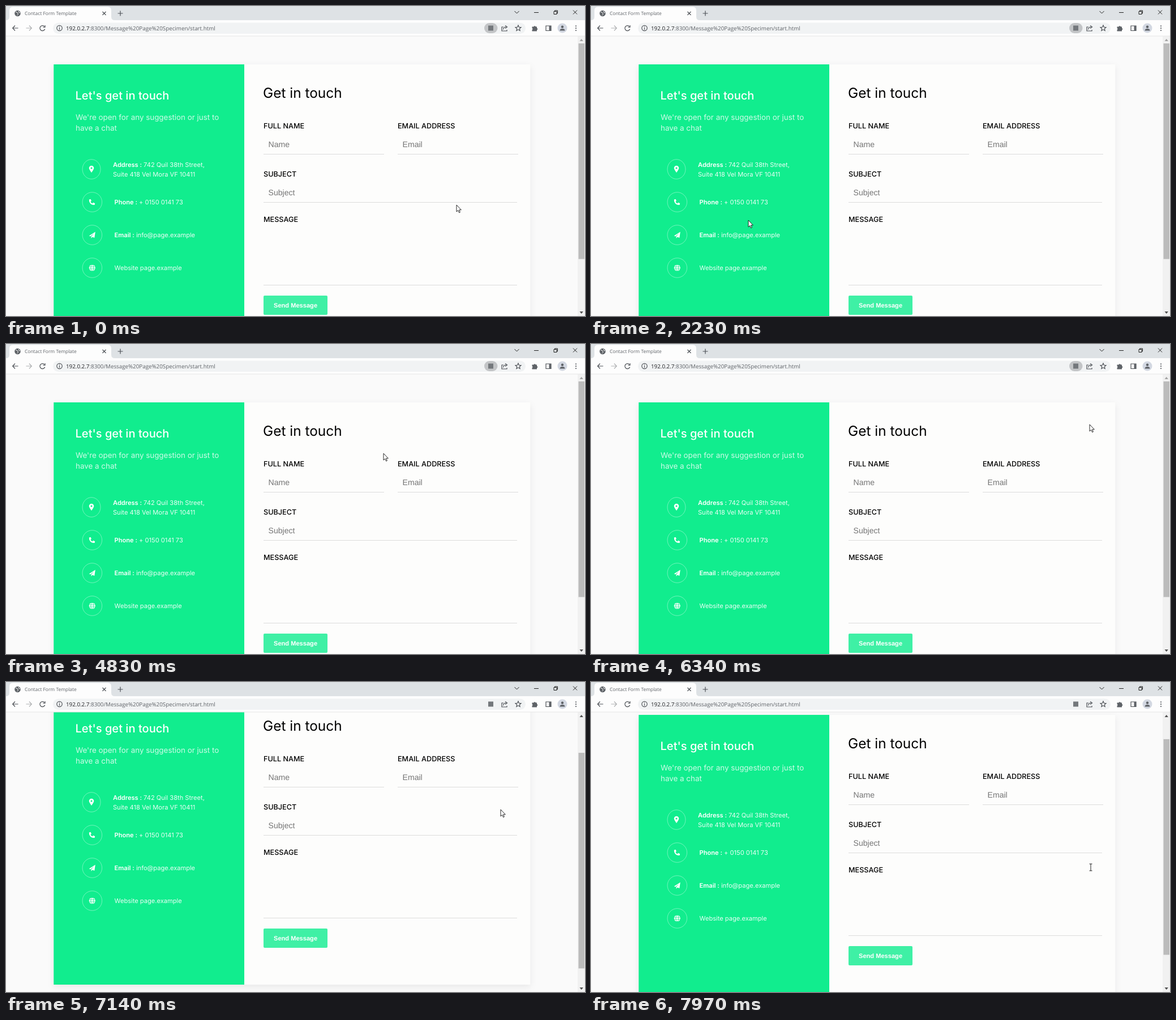
Write an HTML page that moves like this. It is 1023x547 px and loops after 8 s.

```html
<!DOCTYPE html>
<html lang="en">
<head>
<meta charset="utf-8">
<title>Contact form</title>
<style>
  html, body { margin: 0; width: 100%; height: 100%; overflow: hidden; background: #fafafa; }
  svg { display: block; width: 100%; height: 100%; text-rendering: geometricPrecision; cursor: none; }
  #page { font-family: Inter, sans-serif; }
  #chrome { font-family: "Open Sans", sans-serif; fill: #5f6368; }
  .card { fill: #fdfdfc; filter: drop-shadow(0 4px 6px #00000012); }
  .green { fill: #11ed8e; }
  .title { font-size: 20.1px; font-weight: 500; fill: #fff; }
  .heading { font-size: 24.4px; fill: #000; }
  .intro { font-size: 13.4px; fill: #fffc; }
  .contact { font-size: 11.1px; fill: #ffffffea; }
  .contact .name { font-weight: 600; fill: #fff; }
  .label { font-size: 12.65px; font-weight: 500; fill: #000; }
  .hint { font: 14.1px "Liberation Sans", Arial, sans-serif; fill: #757575; }
  .button { font: bold 11.1px "Liberation Sans", Arial, sans-serif; fill: #fff; }
  .rule { stroke: #dcdcdc; }
  .ring { fill: none; stroke: #fff; stroke-opacity: .4; }
  .cut { fill: none; stroke: #11ed8e; stroke-width: .8; }
  .line { fill: none; stroke: #4d5156; stroke-width: 1.2; }
  .thin { fill: none; stroke: #222; }
</style>
</head>
<body>
<svg viewBox="0 0 1023 547" preserveAspectRatio="none">
  <rect width="1023" height="547" fill="#fafafa"/>

  <g id="page">
    <rect class="card" x="84.25" y="103" width="842" height="507"/>
    <rect class="green" x="84.25" y="103" width="336.75" height="507"/>
    <text class="title" x="122.5" y="165">Let's get in touch</text>
    <text class="intro" x="123" y="201">We're open for any suggestion or just to</text>
    <text class="intro" x="123" y="220">have a chat</text>
    <g id="contacts"></g>
    <text class="heading" x="454" y="161.5">Get in touch</text>
    <g id="fields"></g>
    <rect x="455" y="511" width="113" height="34" rx="2" fill="#3ff0a5"/>
    <text class="button" x="473" y="532">Send Message</text>
  </g>

  <rect x="1010" y="53" width="13" height="494" fill="#f1f1f1"/>
  <rect id="thumb" x="1011.5" width="10.5" height="380.5" fill="#bbb"/>
  <path id="up" d="M1013.5 62l3.2-4 3.2 4Z"/>
  <path d="M1013.5 539l3.2 4 3.2-4Z" fill="#505050"/>

  <g id="chrome">
    <rect width="1023" height="26" fill="#dee2e5"/>
    <path d="M0 53V25Q6 25 6 19V8Q6 1.500 12 1.500H180Q186 1.500 186 8V19Q186 25 192 25H1023V53Z" fill="#fdfdfd"/>
    <path d="M0 53H1023" stroke="#e6e6e6"/>

    <circle cx="20.5" cy="13" r="5.3"/>
    <path d="M17 10.500l3 1 1.500 3-2 2M22 9l1 2.500 2 .5" stroke="#fff" fill="none"/>
    <text x="33" y="16" font-size="8.45">Contact Form Template</text>
    <path class="line" d="M170.500 10l6 6m0-6l-6 6M197.500 13h9M202 8.500v9"/>
    <path class="thin" d="M898.500 9l4 4 4-4M933 11.500h8M968 9.500h5v5h-5ZM969.500 9.500V8h5v5H973M1002 7.500l7 7m0-7l-7 7"/>

    <path class="line" d="M21.500 39H12m4-4.500L11.700 39l4.300 4.500"/>
    <path class="line" d="M35.500 39H45m-4-4.500l4.300 4.500-4.300 4.500" opacity=".45"/>
    <path class="line" d="M68 36.500A4.500 4.500 0 1 0 68.700 40.500M69 34v3.500h-3.500"/>

    <rect x="83" y="29.5" width="835" height="19.5" rx="9.7" fill="#f1f3f4"/>
    <circle class="line" cx="94.5" cy="39" r="4.7"/>
    <path class="line" d="M94.500 38.500v3.200m0-5.500v1.200"/>
    <text x="106" y="42.5" font-size="9.8"><tspan fill="#202124">192.0.2.7</tspan>:8300/Message%20Page%20Specimen/start.html</text>

    <rect id="pill" x="845" y="30" width="23.5" height="18" rx="9" fill="#c3c5c7"/>
    <rect x="852" y="34.5" width="9" height="9" fill="#74787c"/>
    <path class="line" d="M879 37h-3v7h9v-2m-6.500-.5q.5-4.500 5-4.500m-1.500-2.500l3.500 2.500-3.500 2.500"/>
    <path class="line" id="star"/>
    <path d="M929.500 36.500h3a1.700 1.700 0 0 1 3.300 0h2.200V39a1.700 1.700 0 0 1 0 3.300v2.200h-8.500V42a1.700 1.700 0 0 0 0-3Z"/>
    <path class="line" d="M954 35h9v8.500h-9Z"/>
    <path d="M959.500 35h3.500v8.500h-3.500Z"/>
    <circle cx="983" cy="39" r="8.500" fill="#d3d8e2"/>
    <circle cx="983" cy="36.800" r="2.200"/>
    <path d="M978.500 43.500q0-3.500 4.500-3.500t4.500 3.500Z"/>
    <path d="M1007 35.300v8" stroke="#5f6368" stroke-width="2.200" stroke-linecap="round" stroke-dasharray="0 3.900"/>
  </g>

  <g id="cursor">
    <path id="arrow" d="M0 0V12L2.700 9.500L4.600 13.700L6.400 12.900L4.600 8.800H8.300Z" fill="#fff" stroke="#111" stroke-width=".9"/>
    <path id="beam" class="thin" d="M-2.500-6h5M0-6v12m-2.500 0h5"/>
  </g>
</svg>
<script>
const LOOP = 8000;
const el = id => document.getElementById(id);
const clamp = k => Math.min(1, Math.max(0, k));

// Icons are drawn around their own centre
const pin = `<path d="M0 6Q-4.300 0-4.300-2A4.300 4.300 0 0 1 4.300-2Q4.300 0 0 6Z"/><circle class="green" cy="-2" r="1.600"/>`;
const phone = `<path d="M-5.500-4.500l2.700-.7 1.400 3L-3-.8q1 2.200 3.300 3.300l1.500-1.700 3.100 1.400-.7 2.800q-5.200.5-8-3.200-2-2.600-1.700-6.300Z"/>`;
const plane = `<path d="M-5.500 1.500l11-7L4 5 .3 3.500-1.700 6V2.700l5.200-6L-3 2.400Z"/>`;
const globe = `<circle r="5.600"/><path class="cut" d="M-6-1.800H6M-6 1.800H6"/><ellipse class="cut" rx="2.500" ry="5.600"/>`;

const contacts = [
  { icon: pin, name: "Address :", lines: ["742 Quil 38th Street,", "Suite 418 Vel Mora VF 10411"], radius: 16 },
  { icon: phone, name: "Phone :", lines: ["+ 0150 0141 73"] },
  { icon: plane, name: "Email :", lines: ["info@page.example"] },
  { icon: globe, name: "", lines: ["Website page.example"] }
];
el("contacts").innerHTML = contacts.map(({ icon, name, lines, radius = 17.3 }, row) => {
  const y = 288 + 58 * row;
  const x = 157 + 2 * radius;
  const top = y + 4 - 8.5 * (lines.length - 1);
  const texts = lines.map((line, i) =>
    `<text class="contact" x="${x}" y="${top + 17.5 * i}">${i ? "" : `<tspan class="name">${name}</tspan> `}${line}</text>`);
  return `<g transform="translate(${135 + radius} ${y})" fill="#fff">
    <ellipse class="ring" rx="${radius}" ry="17.3"/>${icon}</g>${texts.join("")}`;
}).join("");

function field(label, hint, x, y, width, height = 46) {
  return `<text class="label" x="${x}" y="${y}">${label}</text>
    <text class="hint" x="${x + 8.5}" y="${y + 33.5}">${hint}</text>
    <path class="rule" d="M${x} ${y + height}h${width}"/>`;
}
el("fields").innerHTML =
  field("FULL NAME", "Name", 455, 215.5, 213) +
  field("EMAIL ADDRESS", "Email", 692, 215.5, 213) +
  field("SUBJECT", "Subject", 455, 300.5, 448) +
  field("MESSAGE", "", 455, 381, 448, 111.5);

const starPoints = Array.from({ length: 10 }, (_, i) => {
  const radius = i % 2 ? 2.4 : 5.2;
  const angle = i * Math.PI / 5;
  return [905 + radius * Math.sin(angle), 39.2 - radius * Math.cos(angle)];
});
el("star").setAttribute("d", `M${starPoints.join("L")}Z`);

// Places the pointer passes: time, x, y
const stops = [
  [0, 796, 351], [1060, 352, 383], [2100, 232, 415], [3370, 682, 58], [3950, 980, 270],
  [4830, 667, 193], [5000, 929, 111], [5540, 897, 73], [6200, 897, 73],
  [6340, 881, 142], [7140, 874, 225], [LOOP, 883, 331]
];
function pointerAt(time) {
  const next = stops.findIndex(stop => stop[0] > time);
  const [t0, x0, y0] = stops[next - 1];
  const [t1, x1, y1] = stops[next];
  const k = (time - t0) / (t1 - t0);
  return [x0 + (x1 - x0) * k, y0 + (y1 - y0) * k].map(Math.round);
}

// Each turn of the wheel glides to a stop
function turn(time, start, distance) {
  return distance * (1 - (1 - clamp((time - start) / 190)) ** 2);
}

function draw(now) {
  const time = now % LOOP;
  const offset = Math.round(turn(time, 6550, 76) + turn(time, 7200, 37) + turn(time, 7840, -76));
  const overText = time >= 7600;

  el("page").setAttribute("transform", `translate(0 ${-offset})`);
  el("thumb").setAttribute("y", 66 + offset * 0.775);
  el("up").setAttribute("fill", offset ? "#505050" : "#a3a3a3");
  el("pill").setAttribute("opacity", clamp((7050 - time) / 100));
  el("cursor").setAttribute("transform", `translate(${pointerAt(time)})`);
  el("arrow").setAttribute("visibility", overText ? "hidden" : "visible");
  el("beam").setAttribute("visibility", overText ? "visible" : "hidden");
}

let start;
function frame(now) {
  start ??= now;
  draw(Math.max(0, now - start));
  requestAnimationFrame(frame);
}
draw(0);
requestAnimationFrame(frame);
</script>
</body>
</html>
```
